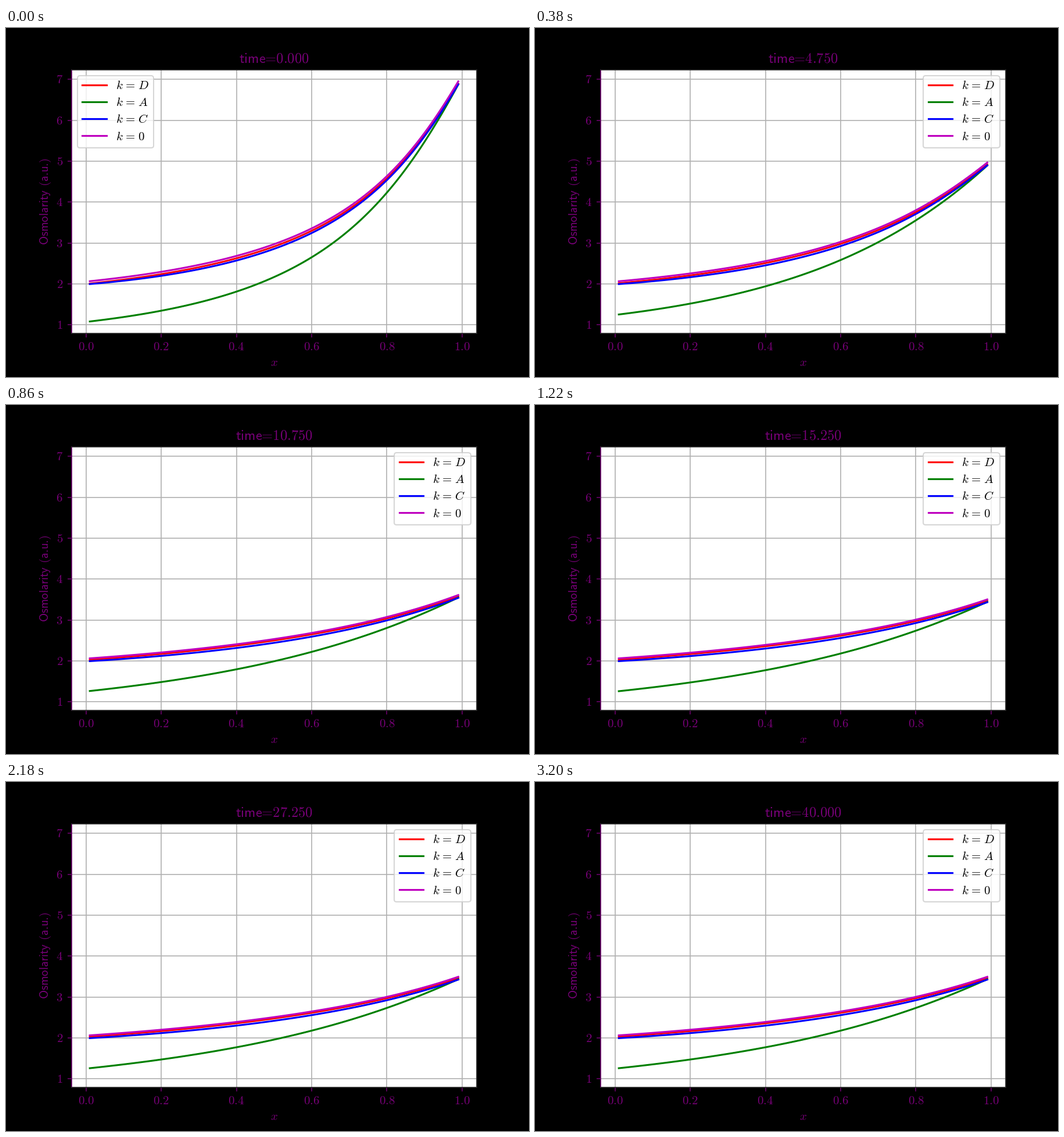
Write a matplotlib script that moves like this. It is 900 by 600 pixels and loops after 3220 ms.

```python
import numpy as np
import matplotlib.pyplot as plt
from matplotlib.animation import FuncAnimation

plt.rcParams.update({"mathtext.fontset": "cm", "font.family": "Liberation Serif"})

FRAMES, STEP_MS, DT = 161, 20, 0.25
INK, FRAME_DARK, FRAME_LEFT = "#780078", "#262626", "#680068"
x = np.linspace(0.01, 0.99, 99)


def decay(t):
    """Share of the initial state left: slow start, exponential tail."""
    s = min(t, 10.75)
    return np.exp(-s * (0.03165 + 0.01273 * s + 0.000743 * s * s) - 0.56 * (t - s))


def profiles(t):
    """Values of all four curves; 1/y relaxes towards its steady shape."""
    w = decay(t)
    steady = 0.4867 - 0.148 * x - 0.055 * x**2
    base = 1 / (steady - w * x * (0.075 + 0.1 * x - 0.032 * x**6))

    steady = 0.8017 - 0.6185 * x + 0.045 * x**2 + 0.0595 * x**3
    drop = 0.1718 * np.sin(2.27 * (x - 0.3)) - 0.026
    lag = 0.18 * (1 - x) * (1 - x**3)
    low = 1 / (steady - w * drop - (w - w**3.3) * lag)

    return {
        "D": base - 0.033 - 0.025 * w,
        "A": low,
        "C": base - 0.068 - (0.09 + 0.1 * w) * x * (1 - x),
        "0": base,
    }


def title_text(t):
    return rf"$\mathsf{{time\hspace{{-0.2}}=\hspace{{-0.2}}{t:.3f}}}$"


fig, ax = plt.subplots(figsize=(6, 4), dpi=150, facecolor="black")
fig.subplots_adjust(left=0.125, right=0.9, bottom=0.125, top=0.88)
ax.set(xlim=(-0.039, 1.039), ylim=(0.788, 7.2335))

xticks = np.arange(6) / 5
yticks = range(1, 8)
ax.set_xticks(xticks, [f"${v:.1f}$" for v in xticks])
ax.set_yticks(yticks, [f"${v}$" for v in yticks])
ax.tick_params(color=FRAME_LEFT, labelcolor=INK)
ax.spines[:].set_color(FRAME_DARK)
ax.spines["left"].set_color(FRAME_LEFT)
ax.grid(True)

ax.set_xlabel("$x$", color=INK)
ax.set_ylabel(r"$\mathsf{Osmolarity\hspace{0.38}(a.\hspace{-0.2}u.\hspace{-0.2})}$",
              color=INK, labelpad=2.8)
title = ax.set_title(title_text(0), fontsize=11.75, color=INK)

lines = {}
for (name, y), color in zip(profiles(0).items(), "rgbm"):
    label = rf"$k\hspace{{0.116}}=\hspace{{0.116}}{name}$"
    lines[name], = ax.plot(x, y, color=color, label=label)
ax.legend(loc="best", labelspacing=0.455, handletextpad=0.75)


def update(i):
    t = i * DT
    for name, y in profiles(t).items():
        lines[name].set_ydata(y)
    title.set_text(title_text(t))
    return [title, *lines.values()]


anim = FuncAnimation(fig, update, frames=FRAMES, interval=STEP_MS,
                     repeat=True, repeat_delay=0)
plt.show()
```
